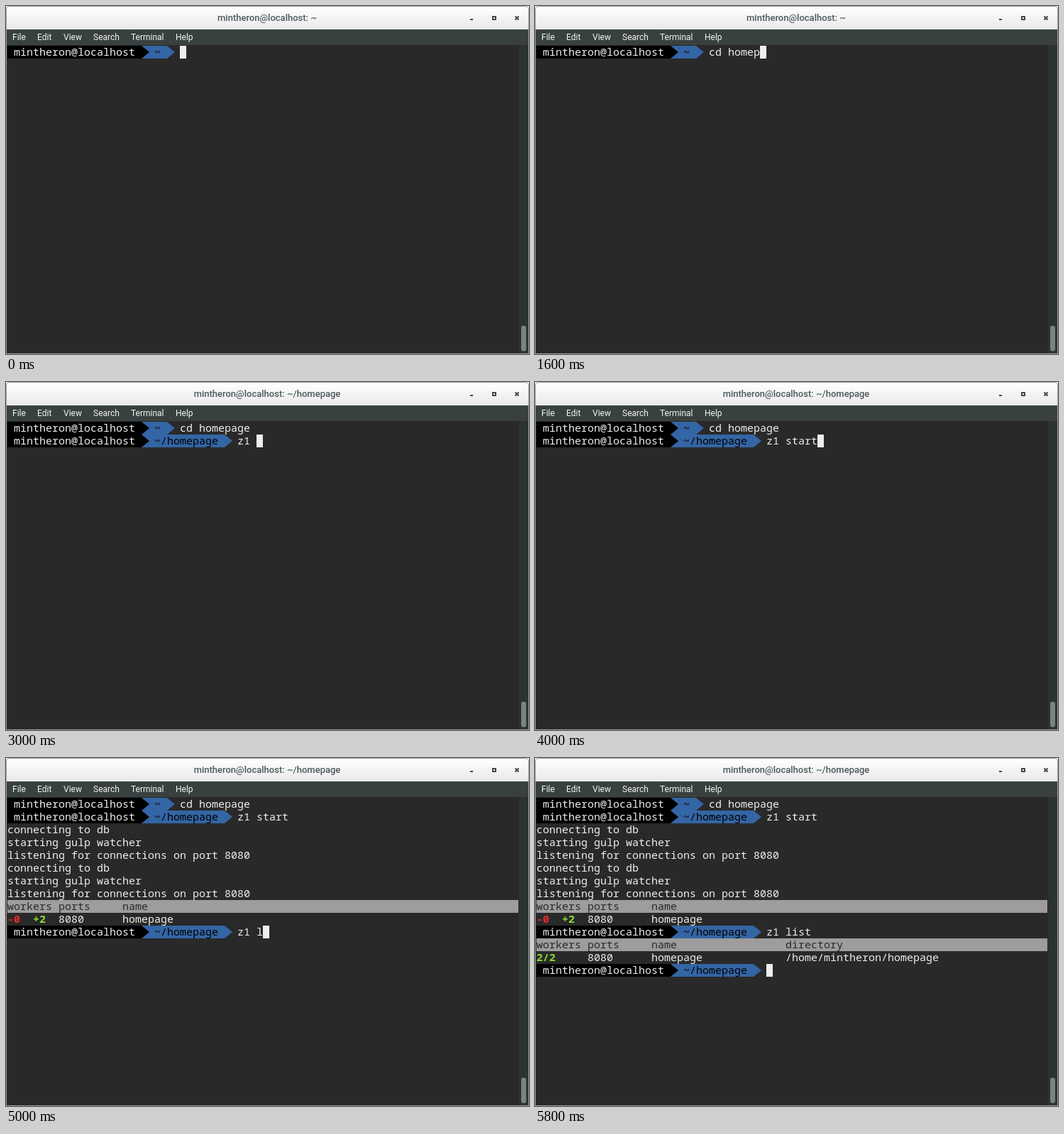
Animation of 737 by 490 pixels, one loop 6.6 s. Source, as an HTML page with a canvas:

```html
<!DOCTYPE html>
<html lang="en">
<head>
<meta charset="utf-8">
<title>Terminal</title>
<style>
  html, body { margin: 0; width: 100%; height: 100%; overflow: hidden; background: #fff; }
  canvas { display: block; }
</style>
</head>
<body>
<canvas id="stage" width="737" height="490"></canvas>
<script>
const ctx = document.getElementById('stage').getContext('2d');
const W = 737, H = 490;
const LOOP = 6600, STEP = 200, LAST = 29;
const CELL = 9, ROW = 18, LEFT = 2, TOP = 56;
const USER = 'mintheron';
const UI = 'Roboto, sans-serif';
const MONO = '15px "Noto Sans Mono", "DejaVu Sans Mono", monospace';
const FG = '#eeeeec', BG = '#292929', BLUE = '#3465a4';
const RED = '#e62c2c', GREEN = '#8ae234';

const LOG = ['connecting to db', 'starting gulp watcher', 'listening for connections on port 8080'];

// Each command: the step its prompt appears, the folder, the text and its output.
const COMMANDS = [
  { at: 0, dir: '~', text: 'cd homepage', output: [] },
  { at: 12, dir: '~/homepage', text: 'z1 start', output: [
    ...LOG.map(plain), ...LOG.map(plain),
    header([0, 'workers'], [8, 'ports'], [18, 'name']),
    line([0, '-0', RED], [4, '+2', GREEN], [8, '8080'], [18, 'homepage'])
  ] },
  { at: 21, dir: '~/homepage', text: 'z1 list', output: [
    header([0, 'workers'], [8, 'ports'], [18, 'name'], [39, 'directory']),
    line([0, '2/2', GREEN], [8, '8080'], [18, 'homepage'], [39, `/home/${USER}/homepage`])
  ] },
  { at: 29, dir: '~/homepage', text: '', output: [] }
];

function plain(text) { return line([0, text]); }
function line(...parts) { return { parts }; }
function header(...parts) { return { parts, bar: true }; }

function box(x, y, w, h, color) {
  ctx.fillStyle = color;
  ctx.fillRect(x, y, w, h);
}

function label(text, x, y, font, color, align = 'left') {
  ctx.font = font;
  ctx.fillStyle = color;
  ctx.textAlign = align;
  ctx.fillText(text, x, y);
}

function cellX(col) { return LEFT + col * CELL; }
function rowY(row) { return TOP + row * ROW; }

function print(text, col, row, color = FG, bold = false) {
  label(text, cellX(col), rowY(row) + 14, (bold ? 'bold ' : '') + MONO, color);
}

function arrow(col, row, color) {
  const x = cellX(col), y = rowY(row);
  ctx.fillStyle = color;
  ctx.beginPath();
  ctx.moveTo(x, y);
  ctx.lineTo(x + 11, y + ROW / 2);
  ctx.lineTo(x, y + ROW);
  ctx.fill();
}

// Draws the prompt and returns the column where typing begins.
function prompt(dir, row) {
  const end = 24 + dir.length, y = rowY(row);
  box(cellX(21), y, (end - 21) * CELL, ROW, BLUE);
  box(LEFT, y, 21 * CELL, ROW, '#000');
  arrow(21, row, '#000');
  arrow(end, row, BLUE);
  print(USER + '@localhost', 1, row);
  print(dir, 23, row, '#000');
  return end + 2;
}

function windowFrame(dir) {
  ctx.clearRect(0, 0, W, H);
  ctx.save();
  ctx.beginPath();
  ctx.roundRect(0, 0, W, H, [5, 5, 0, 0]);
  ctx.clip();
  box(0, 0, W, H, '#9b9b9b');
  ctx.beginPath();
  ctx.roundRect(1, 1, W - 2, H - 2, [4, 4, 0, 0]);
  ctx.clip();

  const shade = ctx.createLinearGradient(0, 1, 0, 33);
  shade.addColorStop(0, '#ffffff');
  shade.addColorStop(1, '#e9e9e9');
  box(1, 1, W - 2, 32, shade);
  box(1, 33, W - 2, 22, '#394040');
  box(1, 55, W - 2, H - 56, BG);
  box(723, 55, 13, H - 56, '#2c3232');
  ctx.restore();

  ctx.fillStyle = '#7c8282';
  ctx.beginPath();
  ctx.roundRect(726, 450, 7, 36, 3.5);
  ctx.fill();

  label(`${USER}@localhost: ${dir}`, 368, 21, '500 13px ' + UI, '#4a5a5d', 'center');
  buttons();

  const menu = { File: 9, Edit: 44, View: 81, Search: 123, Terminal: 176, Help: 239 };
  for (const name in menu) label(name, menu[name], 48, '12px ' + UI, '#f2f4f4');
}

function buttons() {
  const ink = '#3d4b4e';
  box(654, 18, 4, 2, ink);
  ctx.strokeStyle = ink;
  ctx.lineWidth = 2;
  ctx.strokeRect(686, 15, 4, 4);
  ctx.beginPath();
  ctx.moveTo(717.5, 14.5);
  ctx.lineTo(722.5, 19.5);
  ctx.moveTo(722.5, 14.5);
  ctx.lineTo(717.5, 19.5);
  ctx.stroke();
}

function draw(time) {
  const step = Math.min(LAST, Math.floor((time % LOOP) / STEP));
  const shown = COMMANDS.filter(c => c.at <= step);
  const current = shown[shown.length - 1];
  windowFrame(current.dir);

  let row = 0;
  for (const cmd of shown) {
    const typed = cmd.text.slice(0, step - cmd.at);
    const col = prompt(cmd.dir, row);
    print(typed, col, row);
    if (cmd === current) {
      box(cellX(col + typed.length), rowY(row), CELL, ROW, FG);
      break;
    }
    row++;
    for (const { parts, bar } of cmd.output) {
      if (bar) box(LEFT, rowY(row), 80 * CELL, ROW, '#9e9c9c');
      for (const [at, text, color] of parts) {
        print(text, at, row, color || (bar ? BG : FG), !!color);
      }
      row++;
    }
  }
}

const start = performance.now();
function tick() {
  draw(performance.now() - start);
  requestAnimationFrame(tick);
}
tick();
</script>
</body>
</html>
```
